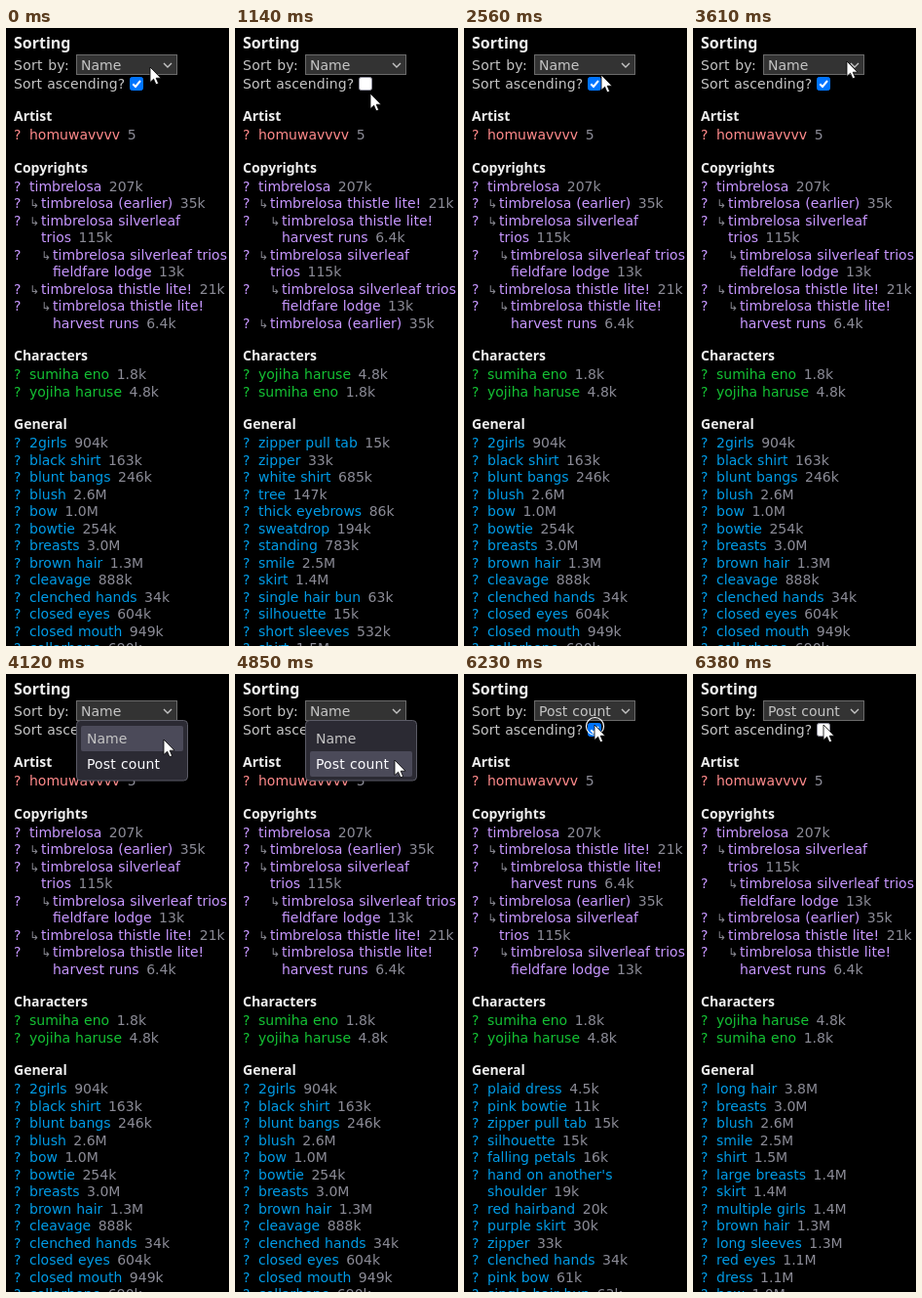
An HTML page for the animation above (8000 ms loop, 229 px wide and 632 px high).

```html
<!DOCTYPE html>
<html lang="en">
<head>
<meta charset="utf-8">
<title>Sorting</title>
<style>
  html, body { margin: 0; width: 100%; height: 100%; overflow: hidden; background: #000; }
  svg { display: block; font: 14px "DejaVu Sans", Verdana, sans-serif; word-spacing: .5px; fill: #c4c4c4; }
  .head { font: bold 14px "Noto Sans", sans-serif; fill: #eee; }
  .title { font-size: 16px; }
  .count { fill: #8b8b96; }
  .arrow { font-size: 12px; fill: #888892; }
</style>
</head>
<body>
<svg width="229" height="632" viewBox="0 0 229 632">
  <text class="head title" x="8" y="21">Sorting</text>
  <text x="8" y="43" letter-spacing=".3">Sort by:</text>
  <text x="8" y="62" letter-spacing=".1">Sort ascending?</text>
  <rect x="72.5" y="27.5" width="103" height="20" fill="#333" stroke="#6b6b6b"/>
  <text id="choice" x="77" y="43"></text>
  <path d="M162 36l4 4 4-4" fill="none" stroke="#c4c4c4" stroke-width="1.4"/>
  <rect id="box" x="127.5" y="50.5" width="13" height="13" rx="2"/>
  <path id="tick" d="M130.3 57.2l2.7 2.8 5-6" fill="none" stroke="#fff" stroke-width="2"/>
  <g id="lists"></g>
  <g id="popup">
    <rect x="72.5" y="47.5" width="114" height="61.5" rx="4" fill="#2b2a33" stroke="#5b5b66"/>
    <rect id="hover" x="77" width="105" height="26" rx="2" fill="#4b4a59"/>
    <text x="83" y="71">Name</text>
    <text x="83" y="97" fill="#fbfbfe" letter-spacing=".15">Post count</text>
  </g>
  <circle id="ring" r="9" fill="none" stroke="#fff" stroke-width="1.2"/>
  <path id="cursor" d="M0 0V15.5L3.6 12.2 6 17.8 8.6 16.7 6.2 11.2H11Z" fill="#fff" stroke="#000" stroke-width=".8"/>
</svg>
<script>
const $ = id => document.getElementById(id);
const LOOP = 8000, TICK = 120;
const TOP = 95, HEAD = 19, ROW = 17.5, GAP = 16;

// "name,count"; "|" marks a line break, kids stay below their parent
const tag = (text, ...kids) => {
  const [name, count] = text.split(",");
  const unit = { k: 1e3, M: 1e6 }[count.slice(-1)] || 1;
  return { name, count, posts: parseFloat(count) * unit, kids };
};
const tags = text => text.split(";").map(s => tag(s));

const sections = [
  { title: "Artist", color: "#ff8a8b", items: tags("homuwavvvv,5") },
  { title: "Copyrights", color: "#c797ff", items: [
    tag("timbrelosa,207k",
      tag("timbrelosa (earlier),35k"),
      tag("timbrelosa silverleaf|trios,115k", tag("timbrelosa silverleaf trios|fieldfare lodge,13k")),
      tag("timbrelosa thistle lite!,21k", tag("timbrelosa thistle lite!|harvest runs,6.4k")))
  ] },
  { title: "Characters", color: "#14c234", items: tags("sumiha eno,1.8k;yojiha haruse,4.8k") },
  { title: "General", color: "#009be6", items: tags(
    "2girls,904k;black shirt,163k;blunt bangs,246k;blush,2.6M;bow,1.0M;bowtie,254k;breasts,3.0M;" +
    "brown hair,1.3M;cleavage,888k;clenched hands,34k;closed eyes,604k;closed mouth,949k;" +
    "collarbone,690k;red eyes,1.1M;dress,1.1M;falling petals,16k;hand on another's|shoulder,19k;" +
    "large breasts,1.4M;long hair,3.8M;long sleeves,1.3M;skirt,1.4M;multiple girls,1.4M;pink bow,61k;" +
    "pink bowtie,11k;plaid dress,4.5k;purple skirt,30k;red hairband,20k;shirt,1.5M;" +
    "short sleeves,532k;zipper pull tab,15k;silhouette,15k;single hair bun,63k;smile,2.5M;" +
    "standing,783k;sweatdrop,194k;thick eyebrows,86k;tree,147k;white shirt,685k;zipper,33k") }
];

function drawLists(key, dir) {
  let out = "", y = TOP;
  const text = (x, body, cls = "") => `<text class="${cls}" x="${x}" y="${Math.round(y)}">${body}</text>`;
  const compare = (a, b) => dir * (a[key] < b[key] ? -1 : a[key] > b[key] ? 1 : 0);

  const walk = (items, depth) => [...items].sort(compare).forEach(({ name, count, kids }) => {
    const x = 24 + 12 * depth;
    out += text(8, "?");
    if (depth) out += text(x - 12, "↳", "arrow");
    const lines = name.split("|");
    lines[lines.length - 1] += `<tspan class="count" dx="7.5">${count}</tspan>`;
    for (const line of lines) {
      out += text(x, line);
      y += ROW;
    }
    walk(kids, depth + 1);
  });

  for (const { title, color, items } of sections) {
    out += `<g fill="${color}">` + text(8, title, "head");
    y += HEAD;
    walk(items, 0);
    y += GAP;
    out += "</g>";
  }
  return out;
}

// Pointer legs: from ms, to ms, where it ends
const home = { x: 148, y: 40 };
const legs = [
  { from: 410, to: 770, x: 135, y: 56 },
  { from: 900, to: 1140, x: 139, y: 67 },
  { from: 1140, to: 1410, x: 133, y: 73 },
  { from: 1440, to: 1680, x: 132, y: 60 },
  { from: 2320, to: 2830, x: 152, y: 34 },
  { from: 3490, to: 3610, x: 158, y: 34 },
  { from: 3640, to: 4480, x: 164, y: 88 },
  { from: 4850, to: 5330, x: 134, y: 52 }
];

// The pointer eases along each leg, seen once per tick
function pointer(t) {
  let { x, y } = home;
  for (const leg of legs) {
    if (t < leg.from) break;
    const seen = Math.floor((t - leg.from) / TICK) * TICK;
    const p = t >= leg.to ? 1 : seen / (leg.to - leg.from);
    const ease = p * p * (3 - 2 * p);
    x += (leg.x - x) * ease;
    y += (leg.y - y) * ease;
  }
  return { x: Math.round(x), y: Math.round(y) };
}

const during = (t, from, to) => t >= from && t < to;
const show = (id, on) => $(id).setAttribute("display", on ? "inline" : "none");

let shown;
function showOrder(key, dir) {
  if (shown === key + dir) return;
  shown = key + dir;
  $("lists").innerHTML = drawLists(key, dir);
  $("choice").textContent = key == "name" ? "Name" : "Post count";
  $("box").setAttribute("fill", dir > 0 ? "#0075ff" : "#fff");
  $("box").setAttribute("stroke", dir > 0 ? "#0075ff" : "#8f8f9d");
  show("tick", dir > 0);
}

function draw(t) {
  const { x, y } = pointer(t);
  const descending = during(t, 1020, 2440) || t >= 6380;
  showOrder(t < 4970 ? "name" : "posts", descending ? -1 : 1);
  show("popup", during(t, 3760, 4970));
  $("hover").setAttribute("y", y < 78 ? 53 : 79);
  show("ring", during(t, 2320, 2440) || during(t, 6230, 6380));
  $("ring").setAttribute("transform", `translate(${x + .5} ${y + 1.5})`);
  $("cursor").setAttribute("transform", `translate(${x} ${y})`);
}

const start = performance.now();
function loop() {
  draw((performance.now() - start) % LOOP);
  requestAnimationFrame(loop);
}
loop();
</script>
</body>
</html>
```
